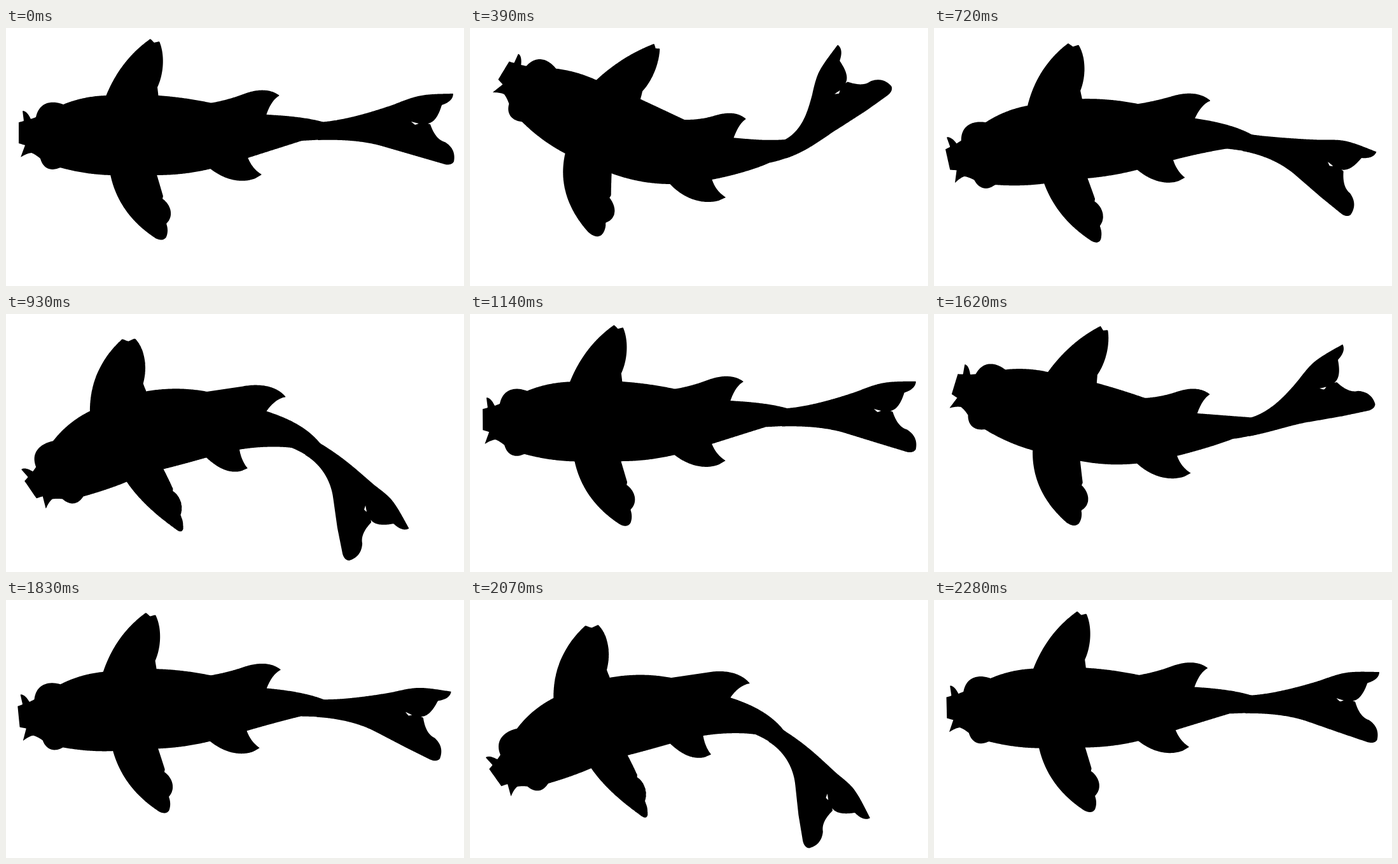
Write an HTML page with a canvas that moves like this. It is 720 px wide and 405 px high and loops after 2.31 s.

```html
<!DOCTYPE html>
<html>
<head>
<meta charset="utf-8">
<title>Swimming fish</title>
<style>
  html, body { margin: 0; height: 100%; overflow: hidden; background: #fff; }
  canvas { display: block; }
</style>
</head>
<body>
<canvas id="stage" width="720" height="405"></canvas>
<script>
const ctx = document.getElementById('stage').getContext('2d');

// Outlines of the fish at rest
const shapes = {
  trunk: `M20 148 L28 146 26 130 Q33 130 39 143 L47 140 C52 116 72 113 90 120 Q122 107 157 106
    Q240 100 324 118 L410 136 Q470 139 500 148 L530 174 500 175 465 177 380 204 322 221
    Q280 231 237 231 L164 231 Q125 230 85 219 C70 226 58 220 54 205 Q47 199 40 196 Q32 197 23 203 L30 184 20 181Z`,
  upperPectoral: 'M157 107 Q180 50 227 17 L233 23 241 21 C250 42 248 72 238 93 L240 110 200 140Z',
  lowerPectoral: `M164 230 Q177 292 235 330 Q247 336 252 328 Q256 318 252 307 C264 296 260 278 246 268
    L247 264 237 230 200 190Z`,
  upperPelvic: 'M320 118 Q345 114 370 105 C395 95 415 95 430 106 Q417 113 409 137 L370 160Z',
  lowerPelvic: 'M380 203 Q387 221 402 230 L392 236 C372 244 345 240 320 220 L350 190Z',
  tail: `M490 148 Q535 146 610 120 C650 104 655 104 703 103 Q703 115 685 121 Q677 148 663 150 L667 151
    Q675 175 690 179 Q708 190 704 210 Q700 216 690 214 L590 185 Q550 174 490 176Z
    M637 147 L649 150 643 152Z`
};

function samplePath(d) {
  return d.split('Z').filter(Boolean).map(sub => {
    const path = document.createElementNS('http://www.w3.org/2000/svg', 'path');
    path.setAttribute('d', sub + 'Z');
    const length = path.getTotalLength(), count = Math.ceil(length / 1.5);
    return Array.from({ length: count }, (_, i) => path.getPointAtLength(i / count * length));
  });
}
const outlines = Object.values(shapes).map(samplePath);

// Each pose turns the head one way and the tail the other; straight is where the body stays level
const PIVOT = 200, AXIS = 165;
const up = { head: 40, straight: 430, tail: -66, dx: 14, dy: -16 };
const down = { head: -36, straight: 320, tail: 65, dx: -4, dy: 26 };

const ease = u => u * u * (3 - 2 * u);
const clamp = u => Math.min(1, Math.max(0, u));

function angleAt({ head, straight, tail }, x) {
  const body = head * Math.cos(Math.PI / 2 * x / straight);
  return body + (tail - body) * ease(clamp((x - 430) / 190));
}

function makeSpine(pose, amount) {
  const spine = [];
  const squeeze = 1 - 0.18 * Math.sqrt(amount);
  const node = (x, px, py) => {
    const a = angleAt(pose, x) * amount * Math.PI / 180;
    const scale = x > 500 && x < 650 ? squeeze : 1;
    return spine[x] = { x: px, y: py, cos: Math.cos(a), sin: Math.sin(a), scale };
  };
  const start = node(PIVOT, PIVOT + pose.dx * amount, AXIS + pose.dy * amount);
  for (const dir of [-1, 1]) {
    let p = start;
    for (let x = PIVOT + dir; x >= 0 && x <= 720; x += dir) {
      p = node(x, p.x + dir * p.cos * p.scale, p.y + dir * p.sin * p.scale);
    }
  }
  return spine;
}

function bend(spine, { x, y }) {
  const s = spine[Math.floor(x)];
  const along = x % 1 * s.scale, off = y - AXIS;
  return [s.x + along * s.cos - off * s.sin, s.y + along * s.sin + off * s.cos];
}

const PERIOD = 1155, STEP = 30;

function poseAt(t) {
  if (t < 600) return [up, ease(t < 300 ? t / 300 : (600 - t) / 300)];
  return [down, ease(t < 900 ? (t - 600) / 300 : (PERIOD - t) / (PERIOD - 900))];
}

function draw(now) {
  const time = Math.floor(now / STEP) * STEP % (2 * PERIOD);
  const spine = makeSpine(...poseAt(time % PERIOD));
  ctx.clearRect(0, 0, 720, 405);
  for (const loops of outlines) {
    const shape = new Path2D();
    for (const loop of loops) {
      loop.forEach((p, i) => shape[i ? 'lineTo' : 'moveTo'](...bend(spine, p)));
      shape.closePath();
    }
    ctx.fill(shape, 'evenodd');
  }
}

const begin = performance.now();
function tick() {
  draw(performance.now() - begin);
  requestAnimationFrame(tick);
}
tick();
</script>
</body>
</html>
```
